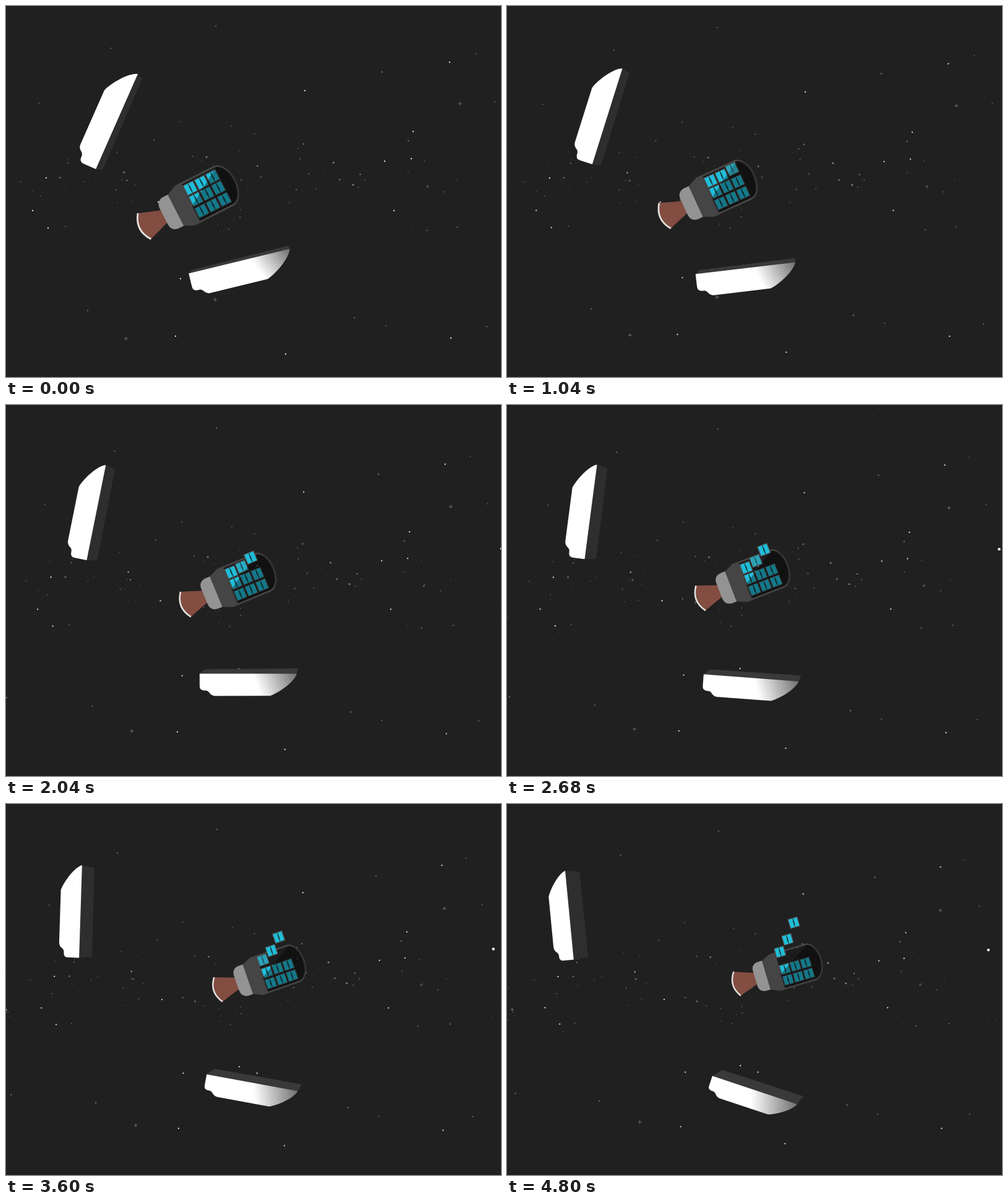
Recreate the animation shown at these times as an HTML page with a canvas. Size 800 by 600 pixels, loop 4840 ms.

```html
<!DOCTYPE html>
<html lang="en">
<head>
<meta charset="utf-8">
<title>Satellite deployment</title>
<style>
  html, body { margin: 0; height: 100%; overflow: hidden; background: #202020; }
  canvas { display: block; }
</style>
</head>
<body>
<canvas id="stage" width="800" height="600"></canvas>
<script>
const ctx = document.getElementById('stage').getContext('2d');
const LOOP = 4840, STEP = 40;

// Landmark stars; all the others are scattered by the seed.
const brightStars = [
  [658, 203], [717, 91], [483, 137], [655, 247], [612, 251], [282, 441], [65, 278], [68, 359],
  [43, 331], [719, 537], [452, 563], [274, 534], [246, 317], [627, 331], [406, 441], [376, 430]
];
const crossStars = [[734, 158], [194, 538], [338, 475]];

let seed = 77;
function random() {
  seed = seed * 16807 % 2147483647;
  return seed / 2147483647;
}

// Two thirds of the stars gather in a band across the middle.
const scattered = Array.from({ length: 165 }, (_, i) => {
  const spread = i < 110 ? 95 : 420;
  const size = random() ** 3;
  return {
    x: random() * 860 - 30,
    y: 290 + (random() + random() - 1) * spread,
    drift: 0.04 + random() * 0.05,
    radius: 0.45 + size,
    alpha: 0.15 + random() * 0.35
  };
});

// Stars recede towards the centre; drift is the part of the way covered in one loop.
function recede(x, y, drift, t) {
  const f = 1 / (1 + drift / (1 - drift) * t / 4.8);
  return [400 + (x - 400) * f, 300 + (y - 300) * f];
}

function dot([x, y], radius, alpha) {
  ctx.fillStyle = `rgba(255,255,255,${alpha})`;
  ctx.beginPath();
  ctx.arc(x, y, radius, 0, 7);
  ctx.fill();
}

function cross([x, y]) {
  ctx.strokeStyle = 'rgba(255,255,255,.4)';
  ctx.lineWidth = 0.8;
  ctx.stroke(new Path2D(`M${x - 3} ${y}h6M${x} ${y - 3}v6`));
}

function drawStars(t) {
  for (const s of scattered) dot(recede(s.x, s.y, s.drift, t), s.radius, s.alpha);
  for (const [x, y] of brightStars) dot(recede(x, y, 0.052, t), 1.15, 0.85);
  for (const [x, y] of crossStars) cross(recede(x, y, 0.1, t));
  dot(recede(820, 229, 0.1, t), 2.2, 1);
}

function fill(path, color) {
  ctx.fillStyle = color;
  ctx.fill(new Path2D(path));
}

// Runs draw in a frame that is moved, turned and scaled.
function placed(x, y, degrees, scale, draw) {
  ctx.save();
  ctx.translate(x, y);
  ctx.rotate(degrees * Math.PI / 180);
  ctx.scale(scale, scale);
  draw();
  ctx.restore();
}

// The seam runs down the y axis, the white shell lies to its left.
function fairing(t, side, shell, edge) {
  fill(side, edge);
  ctx.scale(1 - 0.0037 * t * t, 1);
  fill('M0 0C-14 4-33 30-38.9 46V142Q-38.5 147-35 150Q-29 154-29.5 158Q-30 168-21.9 168H0Z', shell);
}

function drawFairings(t, scale) {
  placed(213 - 25.7 * t + 0.19 * t * t, 110 - 10.8 * t + 2.16 * t * t, 23.8 - 6.1 * t, scale, () => {
    const d = 9.8 + 3.5 * t;
    fairing(t, `M0 0L${d} 4L${d + 1} 165L0 168Z`, '#fff', '#2e2e2e');
  });
  placed(295.3 + 9.4 * t - 0.37 * t * t, 432.6 + 0.6 * t + 0.19 * t * t, -13.7 + 6.7 * t, scale, () => {
    const d = 4.2 + 1.2 * t + 0.3 * t * t;
    const shade = ctx.createLinearGradient(-25, 55 + 6 * t, 0, -2);
    shade.addColorStop(0, '#fff');
    shade.addColorStop(1, '#6a6a6a');
    // The same shell, mirrored so that its seam lies on top.
    ctx.transform(0, -1, -1, 0, 168, 0);
    fairing(t, `M0 0L${d + 1.2} ${1 - 1.6 * t}L${d} ${162 - 1.7 * t}L0 168Z`, shade, '#393939');
  });
}

function panel(u, v) {
  ctx.save();
  ctx.translate(u, v);
  ctx.fillStyle = '#505050';
  ctx.fillRect(-9.4, -9.4, 18.8, 18.8);
  ctx.fillStyle = '#20bdd8';
  ctx.fillRect(-8.2, -8.2, 16.4, 16.4);
  fill('M-.5-8.2h1L1.2 0L.5 8.2h-1L-1.2 0Z', '#12353b');
  ctx.restore();
}

function drawRocket(t, scale) {
  const x = 274.5 + 25.6 * t + 4.72 * t * t - 0.787 * t ** 3;
  const y = 330.2 - 12.5 * t - 1.4 * t * t + 0.35 * t ** 3;
  placed(x, y, -27 + 2.19 * t, scale, () => {
    fill('M-20-10L-57-23.5Q-74 0-57 23.5L-20 11Z', '#834d41');
    ctx.strokeStyle = '#e2e0df';
    ctx.lineWidth = 2.8;
    ctx.stroke(new Path2D('M-57-23.5Q-74 0-57 23.5'));
    fill('M0-28.4H-9Q-22-27-22-14V14Q-22 27-9 28.4H0Z', '#939393');

    const cabin = new Path2D('M26-34.5H86A20.5 34.5 0 0 1 86 34.5H26Z');
    ctx.fillStyle = 'rgba(0,0,0,.15)';
    ctx.fill(cabin);
    fill('M0-28.4L15-35.2Q17-36 19-36H27V36H19Q17 36 15 35.2L0 28.4Z', '#454545');
    ctx.strokeStyle = '#454545';
    ctx.lineWidth = 3;
    ctx.stroke(cabin);

    // The top row leaves one panel at a time, from the nose backwards.
    const columns = [0, 1, 2].map(i => ({
      u: 37 + 20.3 * i,
      lift: 2.55 * Math.max(0, t - 1.25 * (2 - i)) ** 2
    }));
    for (const { u, lift } of columns) {
      panel(u, 20);
      panel(u, -1);
      panel(u, -21 - lift);
    }
    fill('M26 6L90-33A19 33 0 0 1 86 33H26Z', 'rgba(0,0,0,.37)');
    // Panels leave the shadow as they rise.
    for (const { u, lift } of columns) {
      ctx.globalAlpha = Math.min(1, lift / 9);
      panel(u, -21 - lift);
    }
  });
}

const start = performance.now();

function render() {
  const ms = (performance.now() - start) % LOOP;
  const t = Math.floor(ms / STEP) * STEP / 1000;
  const scale = 1 / (1 + 0.034 * t);
  ctx.fillStyle = '#202020';
  ctx.fillRect(0, 0, 800, 600);
  drawStars(t);
  drawFairings(t, scale);
  drawRocket(t, scale);
  requestAnimationFrame(render);
}
render();
</script>
</body>
</html>
```
